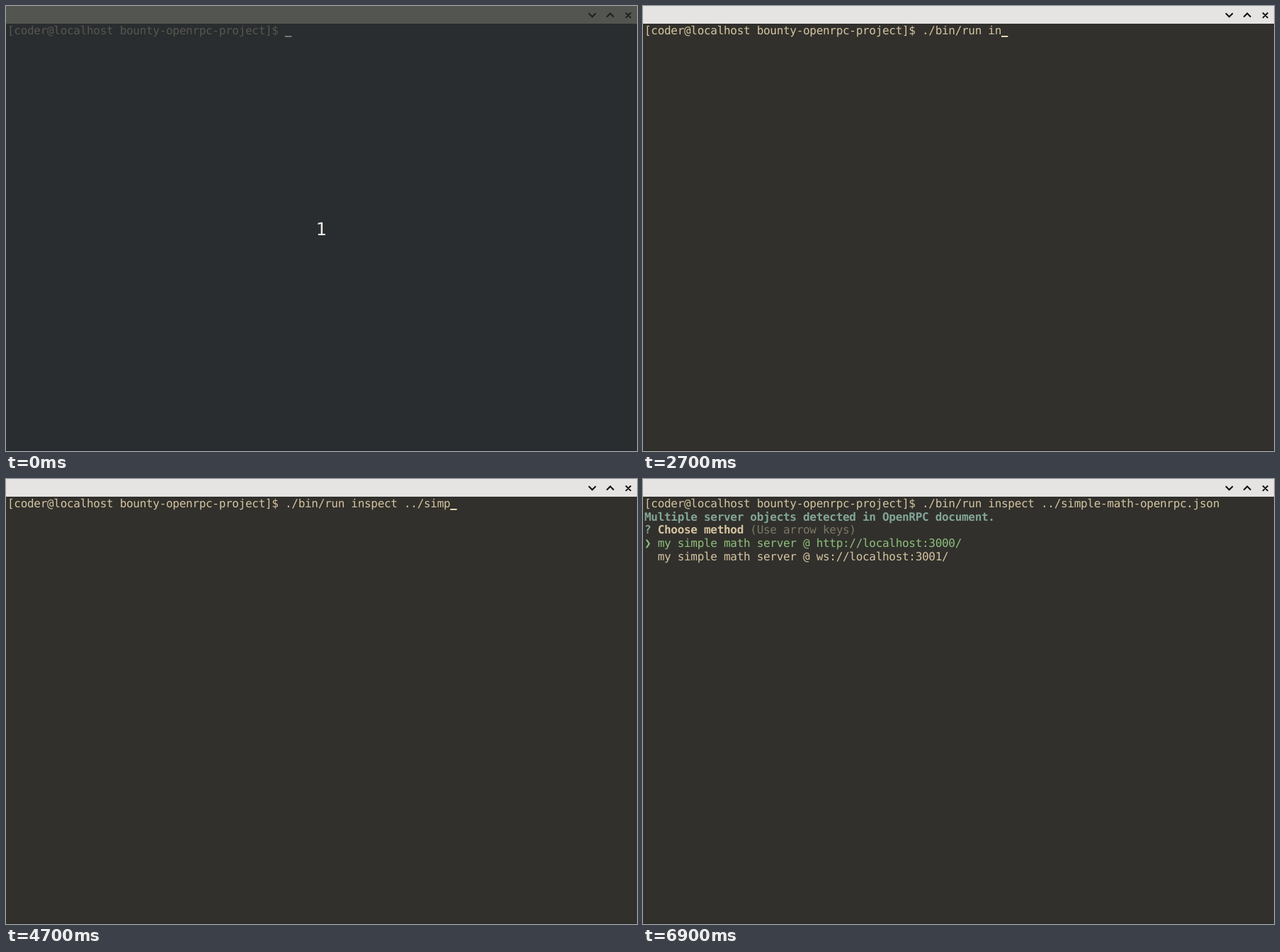
Recreate the animation shown at these times as an HTML page. Size 891 by 629 pixels, loop 8000 ms.

```html
<!DOCTYPE html>
<html lang="en">
<head>
<meta charset="utf-8">
<title>Terminal session</title>
<style>
  html, body { margin: 0; width: 100%; height: 100%; overflow: hidden; }
  svg {
    --bg: #31302c; --bar: #e5e4e2; --icon: #111; --fg: #d5c4a1; --cursor: #e6d8b4; --edge: #252521;
    display: block; width: 891px; height: 629px; background: var(--bg);
  }
  svg.dim { --bg: #2a2d2f; --bar: #535550; --icon: #1d2021; --fg: #575750; --cursor: #777872; --edge: #222527; }
  text {
    font: 16px "DejaVu Sans Mono", monospace;
    letter-spacing: -0.2995px; /* fits the 9.333px cell */
    text-rendering: geometricPrecision;
    white-space: pre;
    fill: var(--fg);
  }
  .bold { font-weight: bold; }
  .blue { fill: #83a598; }
  .grey { fill: #7c7865; }
  .green { fill: #8ec07c; }
  #count { font-size: 25px; letter-spacing: 0; text-anchor: middle; fill: #eceae4; }
  #icons { fill: none; stroke: var(--icon); stroke-width: 2; }
</style>
</head>
<body>
<svg id="stage" viewBox="0 0 891 629">
  <rect width="891" height="25" fill="var(--bar)"/>
  <rect y="628" width="891" height="1" fill="var(--edge)"/>
  <path id="icons" d="M822.8 10.3l5 5 5-5M848.2 15.5l5-5 5 5M875 9.5l7.4 7.4m0-7.4l-7.4 7.4"/>
  <g id="screen"></g>
  <rect id="cursor" width="9.33" height="2" fill="var(--cursor)"/>
  <text id="count" x="445" y="324">1</text>
</svg>
<script>
const LOOP = 8000, CELL = 28 / 3, ROW = 56 / 3, LEFT = 2, BASE = 40;
const PROMPT = "[coder@localhost bounty-openrpc-project]$ ";
const COMMAND = "./bin/run inspect ../simple-math-openrpc.json ";

// [time, characters typed]; the last jump is a tab completion
const KEYS = [
  [600, 1], [700, 2], [900, 3], [1100, 5], [1200, 6], [1600, 7], [1800, 10],
  [2700, 12], [2800, 13], [3000, 14], [3100, 15], [3300, 16], [3600, 17],
  [3700, 18], [3900, 19], [4100, 20], [4200, 21], [4300, 22], [4500, 23],
  [4600, 24], [4700, 25], [4900, 26], [5000, 27], [5200, COMMAND.length]
];
const LIT = 100, ENTER = 5800, MESSAGE = 6800, MENU = 6900;

const byId = id => document.getElementById(id);
const stage = byId("stage"), screen = byId("screen");
const cursor = byId("cursor"), count = byId("count");

function put(row, col, text, style = "") {
  const el = document.createElementNS("http://www.w3.org/2000/svg", "text");
  el.setAttribute("x", LEFT + col * CELL);
  el.setAttribute("y", BASE + row * ROW);
  el.setAttribute("class", style);
  el.textContent = text;
  screen.append(el);
  return el;
}

const show = (el, on) => { el.style.visibility = on ? "visible" : "hidden"; };

put(0, 0, PROMPT);
const typed = put(0, PROMPT.length, "");
const message = put(1, 0, "Multiple server objects detected in OpenRPC document.", "bold blue");
const menu = [
  put(2, 0, "?", "bold blue"),
  put(2, 2, "Choose method", "bold"),
  put(2, 16, "(Use arrow keys)", "grey"),
  put(3, 0, "❯", "green"),
  put(3, 2, "my simple math server @ http://localhost:3000/", "green"),
  put(4, 2, "my simple math server @ ws://localhost:3001/")
];

function render(t) {
  let length = 0;
  for (const [time, n] of KEYS) if (t >= time) length = n;
  typed.textContent = COMMAND.slice(0, length);

  const row = t < ENTER ? 0 : t < MESSAGE ? 1 : 2;
  cursor.setAttribute("x", LEFT + (row ? 0 : PROMPT.length + length) * CELL);
  cursor.setAttribute("y", 42 + row * ROW);

  stage.classList.toggle("dim", t < LIT);
  show(count, t < LIT);
  show(cursor, t < MENU);
  show(message, t >= MESSAGE);
  menu.forEach(el => show(el, t >= MENU));
}

const start = performance.now();
function tick() {
  render((performance.now() - start) % LOOP);
  requestAnimationFrame(tick);
}
tick();
</script>
</body>
</html>
```
